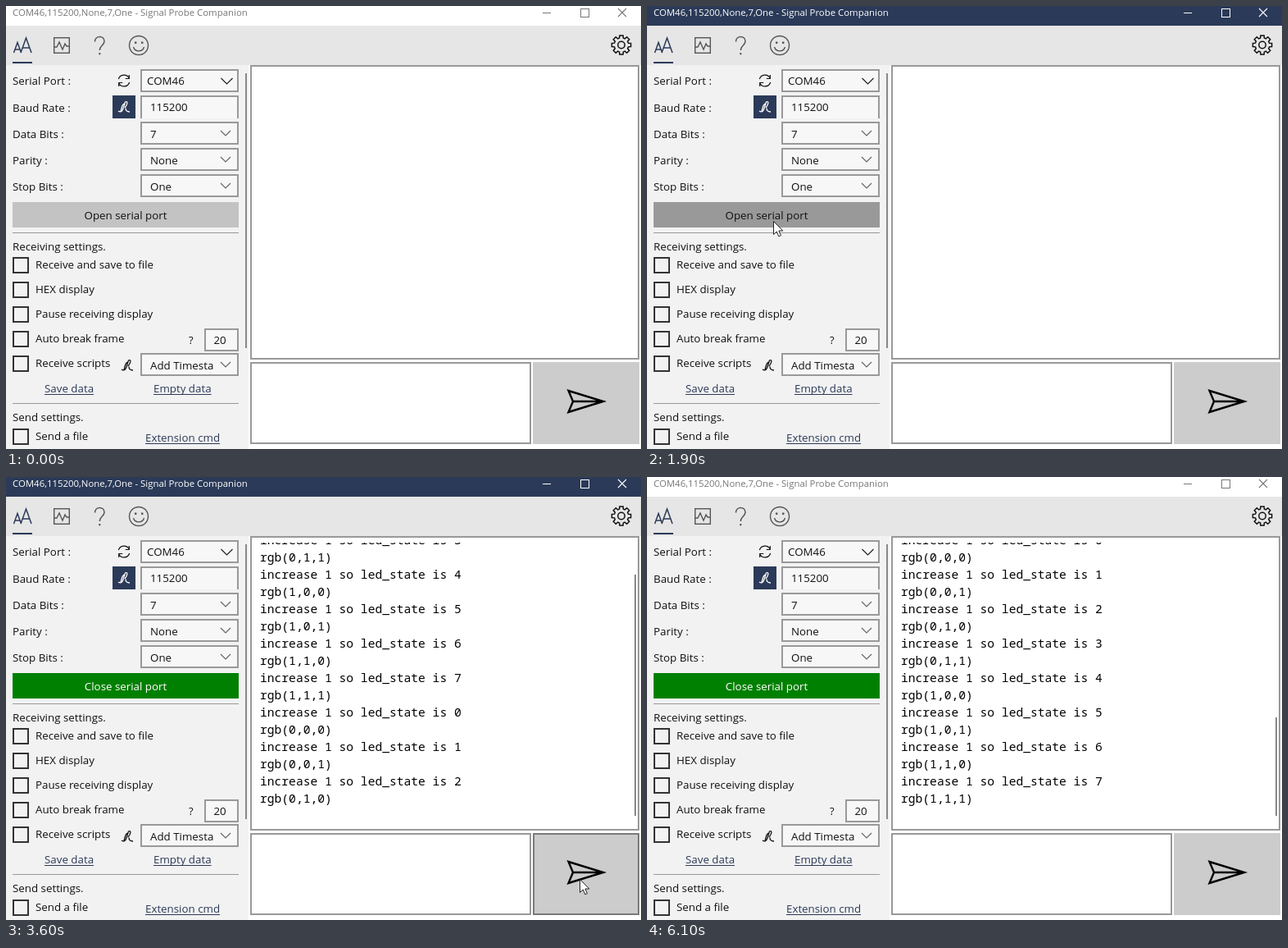
An HTML page with a canvas that plays this animation: 775 px wide and 540 px high, repeating every 6.2 s.

```html
<!DOCTYPE html>
<html lang="en">
<head>
<meta charset="utf-8">
<title>Serial terminal</title>
<style>
html, body { margin: 0; width: 100%; height: 100%; overflow: hidden; background: #fff; }
canvas { display: block; }
</style>
</head>
<body>
<canvas id="stage" width="775" height="540"></canvas>
<script>
const ctx = document.getElementById('stage').getContext('2d');
const LOOP = 6200;
const NAVY = '#2b3a58', EDGE = '#999', EDGE_HOVER = '#666', INK = '#111';
const UI = '"Open Sans", sans-serif';
const MONO = '"Noto Sans Mono", monospace';

// Pointer positions [ms, x, y]; each holds until the next one.
const POINTER = [
  [900, 690, 486], [1000, 560, 420], [1100, 400, 350], [1200, 270, 300],
  [1300, 190, 272], [1400, 154, 262], [2000, 155, 261], [2700, 162, 268],
  [2800, 180, 277], [2900, 202, 285], [3100, 246, 286], [3200, 289, 289],
  [3300, 380, 330], [3400, 510, 400], [3500, 600, 450], [3600, 700, 490]
];

const AREAS = {
  open: [8, 239, 276, 31],
  log: [298, 72, 475, 359],
  input: [298, 434, 343, 100],
  send: [643, 434, 130, 100]
};

function pointerAt(t) {
  if (t < 900 || t >= 3700) return null;
  return POINTER.filter(p => p[0] <= t).pop();
}

function isOver(pointer, [x, y, w, h]) {
  return pointer && pointer[1] >= x && pointer[1] < x + w
    && pointer[2] >= y && pointer[2] < y + h;
}

function fill(color, x, y, w, h) {
  ctx.fillStyle = color;
  ctx.fillRect(x, y, w, h);
}

function frame(color, x, y, w, h, line = 2) {
  ctx.strokeStyle = color;
  ctx.lineWidth = line;
  ctx.strokeRect(x + line / 2, y + line / 2, w - line, h - line);
}

function label(text, x, y, color = INK, size = 13.33, family = UI) {
  ctx.font = `${size}px ${family}`;
  ctx.fillStyle = color;
  ctx.fillText(text, x, y);
}

function stroke(d, color, line, x = 0, y = 0) {
  ctx.save();
  ctx.translate(x, y);
  ctx.strokeStyle = color;
  ctx.lineWidth = line;
  ctx.stroke(new Path2D(d));
  ctx.restore();
}

function circle(x, y, r, color, line) {
  ctx.strokeStyle = color;
  ctx.lineWidth = line;
  ctx.beginPath();
  ctx.arc(x, y, r, 0, Math.PI * 2);
  ctx.stroke();
}

function titleBar(active) {
  const ink = active ? '#fff' : '#777';
  fill(active ? NAVY : '#fff', 0, 0, 775, 24);
  label('COM46,115200,None,7,One - Signal Probe Companion', 8, 12, ink, 11.4);
  stroke('M655 8.5h10', ink, 1);
  frame(ink, 701, 3, 11, 11, 1);
  stroke('M747 3l10 10m0 -10l-10 10', ink, 1.1);
}

function gear(cx, cy) {
  ctx.beginPath();
  for (let i = 0; i < 8; i++) {
    [[-0.27, 8.8], [-0.18, 11.8], [0.18, 11.8], [0.27, 8.8]].forEach(([offset, r]) => {
      const a = i * Math.PI / 4 + offset;
      ctx.lineTo(cx + r * Math.cos(a), cy + r * Math.sin(a));
    });
  }
  ctx.closePath();
  ctx.strokeStyle = INK;
  ctx.lineWidth = 1.5;
  ctx.stroke();
  circle(cx, cy, 4.2, INK, 1.5);
}

function toolbar() {
  const gray = '#555';
  fill('#e6e6e6', 0, 24, 775, 48);
  stroke('M9.5 57L14 44.5L18.5 57M11 53h6M18 57L24.5 39L31 57M20.2 51h8.6', NAVY, 1.5);
  fill(NAVY, 8, 68, 24, 2);
  frame(gray, 58, 38, 20, 20, 1.4);
  stroke('M58 50h4l3 -6l4 9l3 -7l2 3h4', gray, 1.4);
  stroke('M108.5 43.5c0 -8 11.5 -8 11.5 -.5c0 5 -5.7 5 -5.7 11', gray, 1.5);
  fill(gray, 113.3, 57, 2, 2.3);
  circle(162, 48, 11.5, gray, 1.4);
  fill(gray, 157, 43.5, 2.4, 2.4);
  fill(gray, 165, 43.5, 2.4, 2.4);
  stroke('M155.5 50c2 6.5 11 6.5 13 0', gray, 1.4);
  gear(751, 47.5);
}

function combo(y, text, { x = 176, arrow = '#666', baseline = 20 } = {}) {
  fill('#f7f7f7', 164, y, 120, 28);
  frame(EDGE, 164, y, 120, 28);
  label(text, x, y + baseline, INK);
  const wide = x < 176;
  stroke(wide ? 'M262.5 88l7 7l7 -7' : 'M262 0l6 6l6 -6', arrow, 1.2, 0, wide ? 0 : y + 11);
}

function quill(x, y, color) {
  stroke('M1 13C4 15 6 13 7 10L9.5 2C13 0 12.5 5 9 9M8 4C5 6 5.5 10 4 13'
    + 'M10 9.5C10 13 12 14 15 14', color, 1.3, x, y);
}

function checkRow(y, text) {
  frame('#333', 8, y - 10, 20, 20);
  label(text, 36, y + 4);
}

function link(text, x, y) {
  label(text, x, y, NAVY);
  fill(NAVY, x, y + 2, ctx.measureText(text).width, 1);
}

function portButton(t, pointer) {
  const connected = t >= 2100;
  const pressed = t >= 1900 && t < 2000;
  const hover = isOver(pointer, AREAS.open);
  fill(connected ? 'green' : pressed ? '#999' : '#c2c3c2', ...AREAS.open);
  if (hover && !pressed) frame(connected ? '#005000' : '#777', ...AREAS.open);
  ctx.textAlign = 'center';
  label(connected ? 'Close serial port' : 'Open serial port', 146, 260,
    !connected ? INK : hover ? '#d0e6d0' : '#fff');
  ctx.textAlign = 'left';
}

function sidePanel(t, pointer) {
  fill('#f2f2f2', 0, 72, 296, 468);
  ['Serial Port :', 'Baud Rate :', 'Data Bits :', 'Parity :', 'Stop Bits :']
    .forEach((text, i) => label(text, 8, i ? 97 + 32 * i : 96));

  stroke('M137.3 89a7 7 0 0 1 13 -1m0 -4v4.5h-4.5M150.7 93a7 7 0 0 1 -13 1m0 4v-4.5h4.5', INK, 1.2);
  fill(NAVY, 130, 109, 28, 28);
  quill(136, 115, '#fff');

  combo(77, 'COM46', { x: 172, arrow: '#222', baseline: 19 });
  fill('#f7f7f7', 164, 109, 120, 28);
  stroke('M165 137V110H283V137', EDGE, 2);
  label('115200', 176, 128);
  combo(141, '7');
  combo(173, 'None');
  combo(205, 'One');
  portButton(t, pointer);

  fill(EDGE, 8, 276, 276, 1);
  label('Receiving settings.', 8, 298);
  ['Receive and save to file', 'HEX display', 'Pause receiving display',
    'Auto break frame', 'Receive scripts'].forEach((text, i) => checkRow(316 + 30 * i, text));
  label('?', 223, 412, INK, 13);
  fill('#f7f7f7', 242, 393, 42, 28);
  frame(EDGE, 242, 393, 42, 28);
  label('20', 253.5, 412);
  quill(140, 430, INK);
  combo(423, 'Add Timesta');
  link('Save data', 47, 471);
  link('Empty data', 180, 471);
  fill(EDGE, 8, 484, 276, 1);
  label('Send settings.', 8, 506);
  checkRow(525, 'Send a file');
  link('Extension cmd', 170, 531);
  fill('#888', 292, 82, 2, 335);
}

function logLine(i) {
  if (i === 0) return 'Now can use printf, puts on usb_cdc_acm.';
  const state = (3 + Math.floor((i - 1) / 2)) % 8;
  return i % 2
    ? `increase 1 so led_state is ${state}`
    : `rgb(${state >> 2},${state >> 1 & 1},${state & 1})`;
}

function log(t, pointer) {
  fill('#fff', ...AREAS.log);
  frame(isOver(pointer, AREAS.log) ? EDGE_HOVER : EDGE, ...AREAS.log);
  if (t < 2100) return;

  const entries = Math.floor((t - 2100) / 200) + 1;
  const scroll = Math.max(0, 42 * entries - 301);
  ctx.save();
  ctx.beginPath();
  ctx.rect(300, 80, 466, 343);
  ctx.clip();
  for (let i = 0; i <= 2 * entries; i++) {
    const y = 96 + 21 * i - scroll;
    if (y > 75) label(logLine(i), 310, y, '#000', 14.64, MONO);
  }
  ctx.restore();

  if (scroll) {
    const thumb = Math.round(110200 / (42 * entries + 39));
    fill('#888', 767, 413 - thumb, 2, thumb);
  }
}

function sendRow(pointer) {
  fill('#fff', ...AREAS.input);
  frame(isOver(pointer, AREAS.input) ? EDGE_HOVER : EDGE, ...AREAS.input);
  fill('#ccc', ...AREAS.send);
  if (isOver(pointer, AREAS.send)) frame('#7a7a7a', ...AREAS.send);
  stroke('M686.5 469L729 482L686.5 495L692 482ZM692 482H729', '#000', 2.4);
}

function arrowPointer([, x, y]) {
  const shape = new Path2D('M.5 .5V16.5L4.2 13L6.8 18.8L9.4 17.7L6.9 12H11.8Z');
  ctx.save();
  ctx.translate(x, y);
  ctx.fillStyle = '#fff';
  ctx.fill(shape);
  ctx.strokeStyle = '#222';
  ctx.lineWidth = 1;
  ctx.stroke(shape);
  ctx.restore();
}

function draw(t) {
  const pointer = pointerAt(t);
  fill('#fff', 0, 0, 775, 540);
  titleBar(t >= 1900 && t < 6100);
  toolbar();
  sidePanel(t, pointer);
  log(t, pointer);
  sendRow(pointer);
  if (pointer) arrowPointer(pointer);
}

const start = performance.now();
function tick() {
  draw((performance.now() - start) % LOOP);
  requestAnimationFrame(tick);
}
tick();
</script>
</body>
</html>
```
